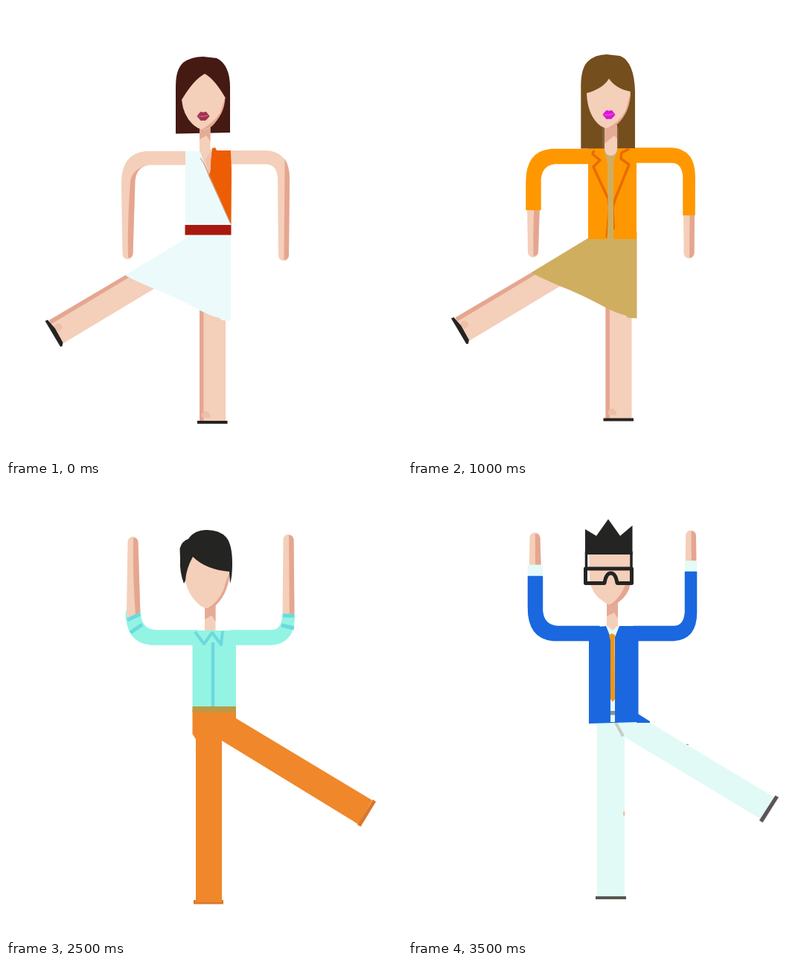
Write an HTML page that moves like this. It is 532 px wide and 607 px high and loops after 4 s.

```html
<!DOCTYPE html>
<html lang="en">
<head>
<meta charset="utf-8">
<title>Dancers</title>
<style>
  html, body { margin: 0; width: 100%; height: 100%; overflow: hidden; background: #fff; }
  svg { display: block; width: 532px; height: 607px; }
</style>
</head>
<body>
<svg id="stage" viewBox="0 0 532 607"></svg>
<script>
const SKIN = '#f4cfba', SHADE = '#e5a690', INK = '#242422';

const fill = (d, color) => `<path d="${d}" fill="${color}"/>`;
const line = (d, color, width) =>
  `<path d="${d}" fill="none" stroke="${color}" stroke-width="${width}" stroke-linejoin="round"/>`;
const rect = (x, y, w, h, color) =>
  `<rect x="${x}" y="${y}" width="${w}" height="${h}" fill="${color}"/>`;
const group = (transform, content) => `<g transform="${transform}">${content}</g>`;
const shift = (x, y, content) => group(`translate(${x} ${y})`, content);
const flipX = (sum, content) => group(`translate(${sum} 0) scale(-1 1)`, content);
const flipY = (sum, content) => group(`translate(0 ${sum}) scale(1 -1)`, content);

// Bare arms, pointing down
const leftArm =
  fill('M250 195H188Q154 198 155 240L156.5 333A7 7 0 0 0 170.5 333L173.5 235Q175 216 193 213.5H250Z', SKIN) +
  fill('M164 338Q163 290 167 235Q170 219 190 213.5Q175 217 173.5 235L170.5 333Q169 339 164 338Z', SHADE);
const rightArm =
  fill('M296 194H350Q381 196 381 232L380 335A7 7 0 0 1 366 335L365 232Q364 213 350 212.5H296Z', SKIN) +
  fill('M373.5 341L374.5 205Q381 216 381 232L380 335Q379 341 373.5 341Z', SHADE);

// Sleeves are a little thicker than the arm inside
const sleeve = (d, color) => fill(d, color) + line(d + 'Z', color, 1.5);
const leftSleeve = (cuff, color, slant = 0) =>
  sleeve(`M250 195H188Q154 198 154.5 240V${cuff}L173.5 ${cuff + slant}V235Q175 216 193 214H250`, color);
const rightSleeve = (cuff, color) =>
  sleeve(`M296 194H350Q380.5 196 380.5 232V${cuff}H365.5V232Q364 213 350 213H296`, color);

// Bare legs, left one raised
const bareLegs =
  fill('M163 360L58 422L77 453L235 358Z', SKIN) +
  fill('M163 360L58 422L61 427L171 361Z', SHADE) +
  rect(260, 380, 35, 178, SKIN) + rect(260, 380, 5.5, 178, SHADE) +
  fill('M263 552Q263 543 270 544Q276 548 274 553Z M64 431Q70 422 75 429Q77 435 70 437Z', '#eebfa9') +
  fill('M52.5 423L56 421.5L66 433L76.5 452L75.5 457L73 457.5Z', INK) + rect(257, 557, 40.5, 4, INK);

const skirt = color =>
  fill('M250 307L160 361.5Q165 365 197 379Q226 390 261 409Q277 417 287 419L290 422L302 423V307Z', color) +
  rect(242, 311, 20, 10, color);

const neck = (x, y, w, h) =>
  rect(x, y, w, h, SKIN) +
  fill(`M${x} ${y}H${x + w}V${y + 24}L${x + w - 5} ${y + 16}L${x} ${y + 21}Z`, '#e6ab96');

const lips = (x, y, color) => shift(x, y,
  fill('M-8.5 0Q-7 -2 -5.5 -4Q-3 -7.5 0 -5Q4 -7.5 5.5 -4Q7 -2 8.5 0Q7 2 5 4Q3 7 0 5.5Q-4 7 -5 4Q-7 2 -8.5 0Z', color) +
  line('M-6 0Q0 1 6 -1', '#ffffff77', 0.8));

const dancers = [
  {
    legAxis: 550, leftAxis: 409, rightAxis: 406.5,
    left: leftArm,
    right: rightArm,
    legs: bareLegs + skirt('#ecfafb'),
    body:
      rect(241, 195, 61.5, 100, '#ecfafb') +
      fill('M277 191L281 190L283 194H302L303 220L302.5 294L272 228Z', '#ec5d04') +
      fill('M260 193H276L274.5 220L272 229Z', SKIN) +
      fill('M268 206L275.5 194L274.5 222L272 228Z', '#efc0aa') +
      line('M261 204L266 212L301 291', '#cda181', 1.2) +
      rect(240.5, 294, 62, 13.5, '#a9190f'),
    head:
      fill('M228 171.5V108Q228 85 238 76Q249 68 265 68L283 70Q301 79 301 109V170Z', '#451a13') +
      neck(260, 158, 14.5, 37) +
      fill('M267 91Q252 99 236 126Q238 146 250 158Q264 172 277 161Q290 148 294.5 123Q280 98 267 91Z', SKIN) +
      fill('M294.5 122Q294 146 275 162Q268 166 264 165Q279 157 288 143Q292 132 294.5 122Z', SHADE) +
      lips(265, 148, '#a53152')
  },
  {
    legAxis: 553, leftAxis: 403, rightAxis: 401.5,
    left: shift(4.5, -2.5, leftArm + leftSleeve(276, '#ff9800')),
    right: shift(4.5, -3, rightArm + rightSleeve(283.5, '#ff9800')),
    legs: shift(5.5, -3.5, bareLegs + skirt('#cfae60')),
    body:
      rect(242, 191, 65, 122, '#ff9800') +
      fill('M263 191H282L276 211V313H268V211Z', '#cfae60') +
      line('M250 194L248 199L258 207L249 216L269 259L270 268', '#e96b02', 3.5) +
      line('M297 192L287 197L286 205L297 213L278 260L275 270', '#e96b02', 3.5) +
      line('M270 266L266.5 311M275.5 266L277 300', '#e96b02', 2) +
      rect(268.5, 212, 7.5, 101, '#cfae60'),
    head:
      fill('M232.3 191.5V112Q231.5 85 241 75Q251 65 267 65L285 67Q304 75 305 115V191Z', '#754e1d') +
      rect(261, 163, 22, 27, '#806039') +
      fill('M264 160H281V192Q280 201 272.5 201Q265 201 264 192Z', SKIN) +
      fill('M264 160H281V178L277 174L264 185Z', '#e6ab96') +
      fill('M270 97.5Q262 111 240 117Q241 144 255 158Q268 170 281 158Q297 142 299 115Q279 111 270 97.5Z', SKIN) +
      fill('M299 115Q299 142 281 159Q274 165 268 164Q283 157 292 141Q296 130 299 115Z', SHADE) +
      lips(270, 146, '#dc16d5')
  },
  {
    legAxis: 560, leftAxis: 408, rightAxis: 407,
    left: shift(7, 0, leftArm + leftSleeve(230, '#93f4e3', 7)) +
      line('M167 211L183 222M163 228L180 236', '#6bd9de', 5),
    right: shift(6.5, 0, rightArm + rightSleeve(234.5, '#93f4e3')) +
      line('M370 220L387 216M372 233H387', '#6bd9de', 5),
    legs:
      fill('M251 300H309.5V333L305 340V560H270V342L87 454L68 422L251 312Z', '#f0872b') +
      rect(268, 556, 40, 5.5, '#d9782a') +
      fill('M63 424L67 421L88 455L83.5 457.5Z', '#d9782a') +
      fill('M270 550H305V559H270Z M70 421L74 419L92 451L87 454Z', '#f0872b'),
    body:
      rect(250.5, 194, 58.5, 104, '#93f4e3') +
      line('M278 210V297', '#6bd9de', 4.5) +
      line('M254 196L266 212L277 197L289 213L291 195', '#6bd9de', 4) +
      rect(250.5, 296, 58.5, 8, '#bd9a43'),
    head:
      neck(267, 158, 14.5, 36) +
      fill('M251 94Q240 110 241 128Q245 146 257 157Q270 171 283 158Q298 142 300 112Z', SKIN) +
      fill('M301 114Q299 143 283 159Q276 166 270 165Q285 156 292 140Q296 126 301 114Z', SHADE) +
      fill('M239 131Q233 116 234 98L233.5 84Q236 74 245 71Q253 59 270 59Q287 59 296 69Q304 79 304 104Q304 122 301 131L300 115Q268 112 251 95Q242 111 241 127Z', INK)
  },
  {
    legAxis: 551, leftAxis: 397, rightAxis: 396,
    left: shift(7, -5.5, leftArm + leftSleeve(296, '#e6faf7') + leftSleeve(281, '#1a67e0')),
    right: shift(7, -5.5, rightArm + rightSleeve(300.5, '#e6faf7') + rightSleeve(286, '#1a67e0')),
    legs:
      fill('M242 308H299L297 330V553H260V337L76 448L57 419L229 316Z', '#e1faf5') +
      line('M272 318L262 336', '#c4cdca', 4) +
      fill('M242 306L226 316V318H244Z', '#1a67e0') +
      rect(258, 551, 41, 4, '#5a5552') +
      fill('M53 418L57.5 415.5L79 449L74.5 452Z', '#5a5552') +
      rect(260, 437, 1.5, 6, '#eab578') + rect(174, 346.5, 3, 1.5, '#b9a89c'),
    body:
      fill('M243 190L267 188H285L309.5 188V317L243 319Z', '#1a67e0') +
      fill('M266 188H284L278 203V317H272V203Z', '#e6faf7') +
      fill('M270 200L274 198L278 200L277.5 208L278 286L275 290L272 286V208Z', '#f3950f') +
      rect(272, 302, 6, 5.5, '#8b9193'),
    head:
      neck(267, 154, 15, 34) +
      fill('M267 187H282L275 194Z', SKIN) +
      fill('M243 88H299V128Q296 145 284 154Q272 165 260 153Q247 145 244 125Z', SKIN) +
      fill('M299 131Q296 147 283 156Q276 162 270 160Q285 152 292 132Z', SHADE) +
      fill('M238 58L253 67L269 44.5L285 67L301.5 53V92H238Z', INK) +
      line('M239.5 88V110M300 88V110', INK, 3.5) +
      line('M238.5 111H300.5V130.5H281Q279 117 272.5 117Q266 117 264 130.5H238.5Z', INK, 5)
  }
];

const dance = (d, up) =>
  (up ? flipY(d.leftAxis, d.left) + flipY(d.rightAxis, d.right) + flipX(d.legAxis, d.legs)
      : d.left + d.right + d.legs) + d.body + d.head;

const poses = dancers.flatMap(d => [dance(d, false), dance(d, true)]);
const stage = document.getElementById('stage');
stage.innerHTML = poses.map(p => `<g opacity="0">${p}</g>`).join('');

[...stage.children].forEach((pose, i) => {
  const from = i / poses.length, to = (i + 1) / poses.length;
  const steps = [[0, 0], [from, 0], [from, 1], [to, 1], [to, 0], [1, 0]];
  pose.animate(steps.map(([offset, opacity]) => ({ offset, opacity })),
    { duration: 4000, iterations: Infinity });
});
</script>
</body>
</html>
```
